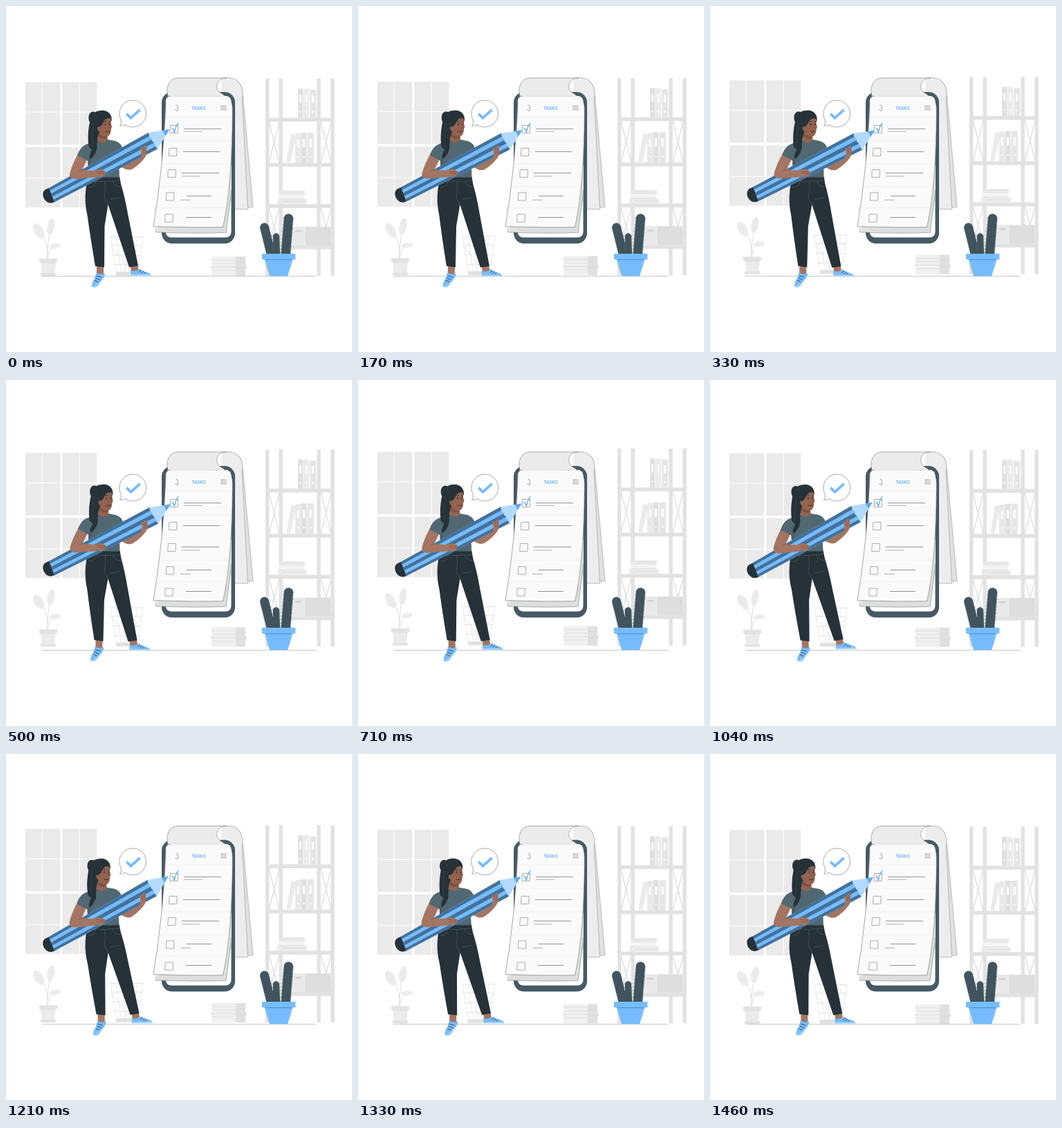
An HTML page with a canvas for the animation above (1500 ms loop, 500 by 500 pixels).

```html
<!DOCTYPE html>
<html lang="en">
<head>
<meta charset="utf-8">
<title>Tasks</title>
<style>
  html, body { margin: 0; width: 100%; height: 100%; overflow: hidden; background: #fff; }
  canvas { display: block; width: 500px; height: 500px; }
</style>
</head>
<body>
<canvas id="stage"></canvas>
<script>
const LOOP = 1500;
const canvas = document.getElementById('stage');
const ctx = canvas.getContext('2d');
const ratio = window.devicePixelRatio || 1;
canvas.width = canvas.height = 500 * ratio;

const BLUE = '#76bcfc', DEEP_BLUE = '#44719a', PALE_BLUE = '#b2daff';
const INK = '#263238', SLATE = '#455a64', SHIRT = '#516872';
const SKIN = '#a37562', FACE = '#93634f', SKIN_SHADE = '#7d4f3f';
const GREY = '#e0e0e0', LIGHT = '#ebebeb', PALE = '#f3f3f3';

const paths = {};
const shape = d => paths[d] || (paths[d] = new Path2D(d));
function fill(color, d) { ctx.fillStyle = color; ctx.fill(shape(d)); }
function line(color, width, d) {
  ctx.strokeStyle = color;
  ctx.lineWidth = width;
  ctx.stroke(shape(d));
}
function rect(color, x, y, w, h) { ctx.fillStyle = color; ctx.fillRect(x, y, w, h); }
function roundRect(color, x, y, w, h, r) {
  ctx.fillStyle = color;
  ctx.beginPath();
  ctx.roundRect(x, y, w, h, r);
  ctx.fill();
}
function oval(color, x, y, rx, ry, turn = 0) {
  ctx.fillStyle = color;
  ctx.beginPath();
  ctx.ellipse(x, y, rx, ry, turn, 0, Math.PI * 2);
  ctx.fill();
}

function drawWindow() {
  rect('#eaeaea', 28, 110, 50.3, 181);
  rect('#eaeaea', 81.3, 110, 50, 181);
  for (const x of [51.6, 105.6]) rect('#fff', x, 110, 1, 181);
  for (const [y, h] of [[152.8, 1], [200.3, 3.4], [248.3, 1]]) rect('#fff', 28, y, 104, h);
}

function binder(color, x, y, w, h) {
  rect(color, x, y, w, h);
  rect('#fafafa', x + w * .3, y + h * .2, w * .4, h * .28);
  oval('#fafafa', x + w / 2, y + h * .8, 1.3, 1.3);
}

function drawShelf() {
  for (const x of [375, 394.5, 449.3, 469.3]) rect('#e2e2e2', x, 105, 5.4, 285);
  for (const y of [161.5, 226.8, 286.3, 346]) rect('#e2e2e2', 379, y, 92, 5.6);
  for (const x of [380, 455]) {
    for (const [top, end] of [[167, 227], [292, 346]]) {
      line('#dedede', 1.3, `M${x} ${top}L${x + 15} ${end}M${x + 15} ${top}L${x} ${end}`);
    }
  }
  binder(GREY, 422, 119.5, 7, 42);
  binder(LIGHT, 429.5, 119.5, 8.5, 42);
  binder('#e6e6e6', 439, 121, 9, 40.5);

  fill(LIGHT, 'M412 185L420 187L411 226H405Z');
  binder('#e9e9e9', 418, 184, 8, 43);
  binder(GREY, 426.5, 183, 8, 44);
  binder('#e6e6e6', 435.5, 183, 9, 44);

  rect(LIGHT, 397, 266.5, 35, 5.5);
  rect(PALE, 395, 272, 36, 6.5);
  rect(LIGHT, 392, 279, 43, 7);
  line('#d8d8d8', .7, 'M397 272H432M395 278.7H431M400 269H429M399 282.5H432');

  rect('#e9e9e9', 413, 319, 21, 27);
  rect('#dedede', 434, 319, 35, 27);
  rect('#d3d3d3', 418, 324, 9, 2.5);
  line('#d0d0d0', .7, 'M434 319V346M466 323L469 333');
}

function drawPottedPlant() {
  line(GREY, 1, 'M60 365Q62 342 50 327M60 365Q60 340 65 318M60 365Q62 348 72 347');
  oval('#ececec', 47.3, 325, 6.5, 12, -.55);
  oval('#ececec', 65, 319, 5.4, 12, .18);
  oval('#efefef', 71, 346.5, 8.5, 4, -.12);
  line('#dfdfdf', .6, 'M43 317L52 333M66.5 309L63.5 330M64 348L77 345');
  rect('#e2e2e2', 48, 365, 26, 5.5);
  fill(LIGHT, 'M50 370.5H72L70 386H52Z');
  rect('#d9d9d9', 50, 370.5, 22, 1);
  fill('#e2e2e2', 'M49 386H73L71 390H51Z');
}

function drawBasket() {
  line(GREY, 1, 'M150.5 333.5H198M152 346H196.5M154 360H194.5M156 374H192');
  line('#e3e3e3', .7, 'M151 334L160 389M159 334L167 389M168 334L173 389M180 334L178 389M189 334L184 389M198 334L190 389');
  rect(GREY, 159, 384, 31, 5.5);
  line('#e3e3e3', .7, 'M153 348L184 389M196 347L165 389');
}

function drawPaperStack() {
  rect('#f0f0f0', 297, 362, 36, 28);
  rect('#e0e0e0', 332, 362, 14, 28);
  line('#dadada', .8, 'M297 367H331M299 372H331M295 377H332M298 382H330M332 370H346M332 379H347');
  rect('#d2d2d2', 345.5, 376, 2, 3);
}

function drawBubble() {
  const outline = 'M166 164.5Q168 169.5 164.5 173.2Q169 173.5 172 171.4A19.4 19.4 0 1 0 166 164.5';
  fill('#fff', outline);
  line('#737b7f', .65, outline);
  line(BLUE, 3.8, 'M174.3 155.7L180.3 161.8L193.6 150');
}

function drawPhone() {
  // Pages turned over the back
  fill('#e1e1e1', 'M318 104Q341 103 342 126L357 290.5L330 293Z');
  fill('#ededed', 'M312 104H319Q340 104 341 128L349.5 294L326 293L310 126Z');
  line('#8b8b8b', .55, 'M318 103.7Q341 103 342 126L357 290.5L350 291.5M341 130L349.5 294L330 293.5');

  roundRect(SLATE, 225, 124.3, 106, 219, 15);
  roundRect('#fff', 230.8, 130, 94.7, 204.5, 8);

  // Page sheets hanging over the screen
  fill('#dedede', 'M225 300L217 327Q270 329 318 327.5L326 270V230Z');
  line('#777', .55, 'M217 320L216.5 327Q270 329 318 327.5L326 265');
  fill('#fafafa', 'M231 139Q231 130 238 130H316Q327 131 327.3 152Q327 260 313.5 319.7Q265 320.5 213 318.6Q227 235 231 139Z');
  line('#6c6c6c', .6, 'M231 139Q227 235 213 318.6Q265 320.5 313.5 319.7Q327 260 327.3 150');

  // Rolled top
  fill('#ebebeb', 'M233.5 129C231 113 238 104 249 104H319C304 104 301 118 309 125L318 131H238Q234 131 233.5 129Z');
  line('#777', .6, 'M238 130.5Q234 131 233.5 129C231 113 238 104 249 104H319C304 104 301 118 309 125');
  line('#d2d2d2', .5, 'M238 130.5H309');

  drawTaskList();
}

function drawTaskList() {
  line('#747474', .7, 'M246.5 142.5Q250 147 248 151.5L244.5 150.5M310 144.5H319M310 147.2H319M310 149.9H319');
  ctx.fillStyle = '#62adf3';
  ctx.font = '600 6.3px Inter, "Open Sans", sans-serif';
  ctx.textAlign = 'center';
  ctx.fillText('TASKS', 278.3, 150.3);
  line('#ebebeb', .7, 'M230 160.5H327M228 195H326M226 228H325M222 261H322M218 291.5H319');

  for (const [x, y] of [[237.5, 172.5], [236, 205.5], [234.3, 236.5], [231.8, 269.8], [230.2, 301]]) {
    line('#828282', .65, `M${x} ${y}h11.2l-.5 11.2h-11.2z`);
  }
  line('#666', .7, 'M257 177.7H311M256 210.5H309M254 241.3H308M261 274.6H297M260 305.5H297');
  line('#8a8a8a', .65, 'M257 181.3H284M254 246H280M252 280.3H267');
  line('#4da0ed', 1.2, 'M240 176Q242.5 178.5 243.3 182Q245 174 249 168.3');
}

function cactusArm(x1, y1, x2, y2, width) {
  ctx.lineCap = 'round';
  line('#42565f', width, `M${x1} ${y1}L${x2} ${y2}`);
  const dx = x2 - x1, dy = y2 - y1, length = Math.hypot(dx, dy);
  const nx = -dy / length, ny = dx / length;
  for (const k of [-.25, 0, .25]) {
    const ox = nx * width * k, oy = ny * width * k;
    line('#394c55', .5, `M${x1 + ox} ${y1 + oy}L${x2 + ox} ${y2 + oy}`);
  }
  ctx.lineCap = 'butt';
  const count = Math.round(length / 5);
  for (let i = 0; i < count; i++) {
    for (const side of [-1, 1]) {
      const x = x1 + dx * i / count + nx * side * width / 2;
      const y = y1 + dy * i / count + ny * side * width / 2;
      line('#546770', .5, `M${x} ${y}l${nx * side * 1.3} -.8`);
    }
  }
}

function drawCactus() {
  cactusArm(373.5, 320, 384, 362, 13);
  cactusArm(408.3, 307, 404, 362, 13.5);
  cactusArm(390.3, 333, 391.5, 362, 9.5);
  fill(BLUE, 'M373.5 366H414.5L407 390.3H381Z');
  rect(BLUE, 369.8, 358, 48.5, 8.3);
  line('#4782b6', .8, 'M375 366.7H413.5');
}

// Body stripes run from the cap edge to the wider sharpened end.
function pencilStripe(color, from, to) {
  const cap = k => `${62 + 8 * k} ${263 + 20.3 * k}`;
  const neck = k => `${206 + 13 * k} ${183 + 23.5 * k}`;
  fill(color, `M${cap(from)}L${neck(from)}L${neck(to)}L${cap(to)}Z`);
}

function drawPencil() {
  fill(INK, 'M62.5 262.8L56.5 265.5Q51 270 54.7 278Q59 285.5 66 284.6L70.5 283.2Z');
  pencilStripe(BLUE, 0, 1);
  for (const [from, to] of [[0, .18], [.4, .62], [.83, 1]]) pencilStripe(DEEP_BLUE, from, to);
  fill(PALE_BLUE, 'M206 183L236.3 178.2L219 206.5Q215 203 215 198Q210 196 210 191Q206 188 206 183Z');
  fill('#5eaaf0', 'M226 179.8L236.3 178.2L230.3 188Q229 183 226 179.8Z');
}

function drawLegs() {
  fill(SKIN, 'M131 374H141L141 389L131 390Z');
  fill(SKIN, 'M180 373H190L192 384L181 386Z');
  fill(BLUE, 'M130.5 385Q136 389.5 142.5 386Q144 391 139 396L132.5 404.5Q127 408.5 124 405.5Q124 399 128 394Z');
  line('#fff', .6, 'M142.8 390Q137 401 125 406.3');
  line(INK, .8, 'M131 390L138 392M129.5 393L136 396M128 396.5L133 399');
  fill(BLUE, 'M180 382.5Q187 384.5 193 380L201 384Q209.5 386 210.3 389.5H180Z');
  line('#fff', .5, 'M180 388.6H210');
  line(INK, .8, 'M192 385L195.5 381.5M195.5 386L198.8 383M199 387L201.5 384.5');
  fill(INK, 'M119 246H164L166 257Q172 277 176 300L191 375.5L178 377.5L147.5 287L142.5 318L142 377.5L129 376Q122 335 117.5 302Q111 276 119 246Z');
  line('#50636c', .6, 'M118 252Q142 255 165 252M143 253Q145 265 142 277L147.5 287M119 262Q128 263 130 253M154 253Q156 261 167 261M151 279L164 277');
}

function drawTorso() {
  fill(SKIN, 'M160 207L171 216Q179 220 183 225L193 216L199 203Q203 201 203.5 207L202 217Q195 228 182 236Q176 238 171 235L160 230Z');
  fill(SHIRT, 'M131 194Q140 199 147 193L158 195Q167 198 168.5 207L170.5 218L163 221L164 247.5H119L118.5 224L103.5 216Q107 204 116 200Z');
  fill('#475c66', 'M118.5 223L124 212L121 232L125 247.5H119ZM163 221L160 211L162 234Z');
  fill(FACE, 'M133 182H146L147 193Q142 201 132 195Z');
  fill(SKIN_SHADE, 'M134 184Q139 190 146 188V191Q138 193 134 188Z');
}

function drawHead() {
  fill(INK, 'M129 153.5C121 150 117 160 121 168C118 182 118 198 120.5 207Q119 215 122 221.5Q130 215 131.5 205Q131 194 134 184L146 170L152.5 166C154 157 147 150 138 151Q132 151 129 153.5Z');
  fill(FACE, 'M137 168Q142 161.5 151.3 162.5L152 171Q154 175 152 177Q152 186 147 188.5Q139 190 134 181Z');
  fill(INK, 'M131 160Q140 152 150 160.5Q143 162.5 140 169Q138 174.5 134.5 173.5L132.5 186L127 181Z');
  oval(FACE, 134, 177.5, 2, 3.2, -.2);
  line('#3c5058', .5, 'M127 156Q131 158 131 163M126 168Q124 188 124 207');
  line(INK, .9, 'M141.5 167.4Q143.3 165.8 145.5 167.3M148.7 167.3L151.4 167.6');
  oval(INK, 143.7, 170.7, .9, 1.2);
  oval(INK, 150, 170.8, .8, 1.2);
  line(SKIN_SHADE, .8, 'M148 170L149.5 176L147 176.3');
  line('#5d2f2b', 1.3, 'M143.5 181Q146.5 182.8 149.5 180.5');
}

function drawFrontHands() {
  fill(SKIN, 'M104 214L117 222L110 237L126 238Q132 234.5 140 237L145 240L143 243.5Q140 248.5 130 247.5L99 250Q90 249 92.5 241Q96 228 104 214Z');
  fill(SHIRT, 'M116 200Q107 204 103 216L118 223.5L124 208Z');
  line(SKIN_SHADE, .7, 'M110 237L105 239M131 239L143 240.5M132 242L143 243');
  fill(SKIN, 'M193 221Q197 212 194 207Q195 203 198 205L199.5 202Q203 200 203.5 205L203 214Q200 221 194 224Z');
  line(SKIN_SHADE, .7, 'M198 205L199 213M201 204L201.5 212');
}

function drawWoman() {
  drawLegs();
  drawTorso();
  drawHead();
  drawPencil();
  drawFrontHands();
}

function render(time) {
  const phase = (time % LOOP) / LOOP * Math.PI * 2;
  ctx.setTransform(ratio, 0, 0, ratio, 0, 0);
  rect('#fff', 0, 0, 500, 500);

  // Room floats up and down
  ctx.save();
  ctx.translate(0, 3.1 * (Math.cos(phase) - 1));
  drawWindow();
  drawShelf();
  drawPottedPlant();
  drawBasket();
  drawPaperStack();
  ctx.restore();

  line('#a9adaf', .7, 'M51 390.4H448');
  drawBubble();
  drawPhone();
  drawCactus();

  // Woman sways around her middle
  ctx.save();
  ctx.translate(145, 279);
  ctx.rotate(Math.sin(phase) * Math.PI / 180);
  ctx.translate(-145, -279);
  drawWoman();
  ctx.restore();
}

const start = performance.now();
function tick() {
  render(performance.now() - start);
  requestAnimationFrame(tick);
}
tick();
</script>
</body>
</html>
```
